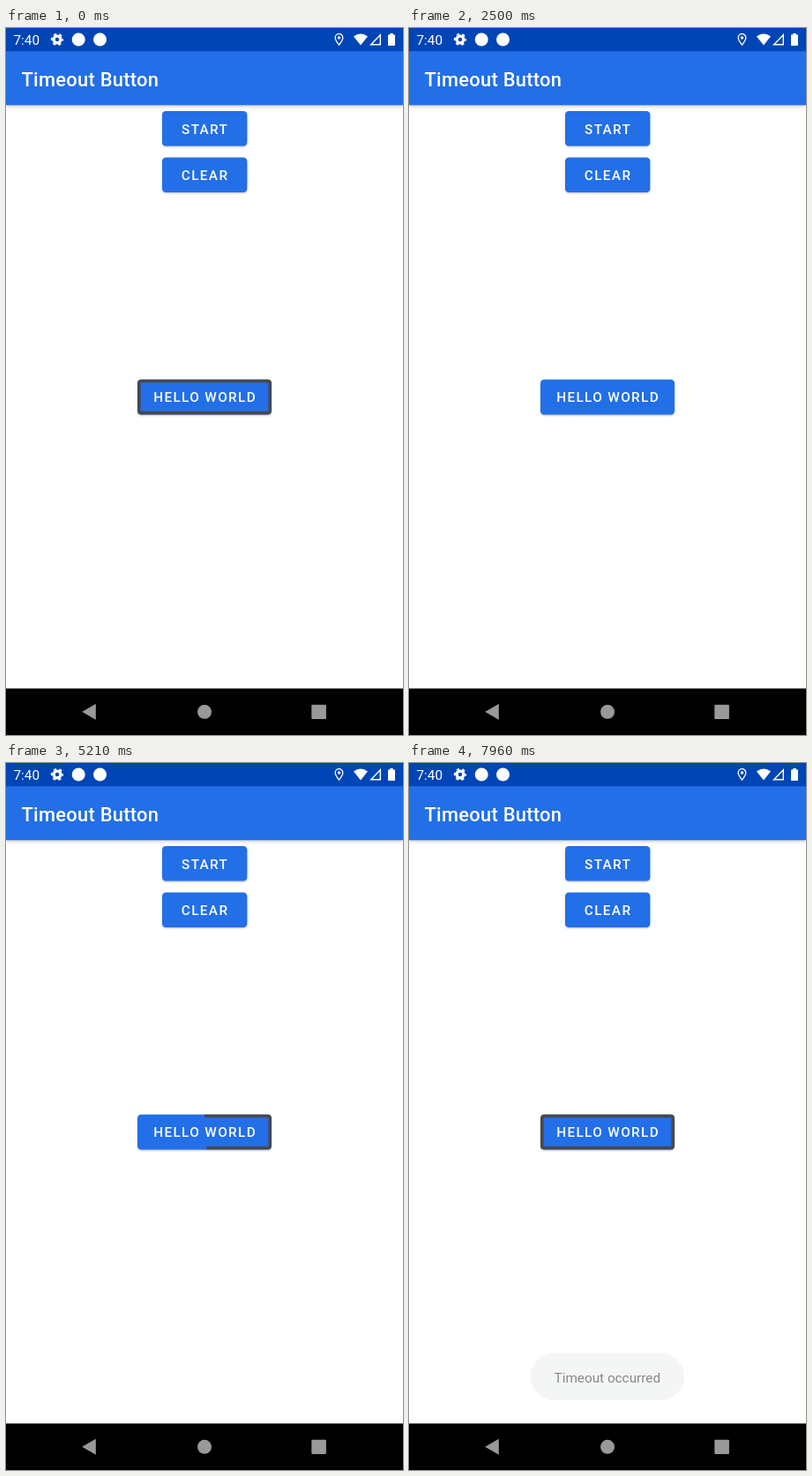
An HTML page for the animation above (8 s loop, 450 by 800 pixels).

```html
<!DOCTYPE html>
<html lang="en">
<head>
<meta charset="utf-8">
<title>Timeout Button</title>
<style>
  html, body { margin: 0; width: 100%; height: 100%; overflow: hidden; background: #fff; }
  svg { display: block; width: 100%; height: 100%; font-family: Roboto, sans-serif; }
  text { fill: #fff; }
  .title { font-size: 21.9px; font-weight: 500; letter-spacing: .0125em; }
  .small { font-size: 15.3px; }
  .button rect { fill: #226fe7; filter: drop-shadow(0 1.2px 1.2px rgba(0, 0, 0, .25)); }
  .button text { font-size: 15.3px; font-weight: 500; letter-spacing: .0893em; text-anchor: middle; }
  .bar { filter: drop-shadow(0 1.5px 2px rgba(0, 0, 0, .25)); }

  .border {
    fill: none; stroke: #47484c; stroke-width: 3.5;
    stroke-dasharray: 1 2;
    animation: countdown 8s linear infinite;
  }
  @keyframes countdown {
    0% { stroke-dashoffset: 0; animation-timing-function: step-end; }
    21.25% { stroke-dashoffset: 1; animation-timing-function: step-end; }
    /* sine ease over five seconds */
    34.125% { stroke-dashoffset: 1; animation-timing-function: cubic-bezier(.37, 0, .63, 1); }
    96.625%, 100% { stroke-dashoffset: 0; }
  }

  .toast { opacity: 0; animation: toast 8s linear infinite; }
  .toast rect { fill: #eaeeec; }
  .toast text { fill: #0f1110; text-anchor: middle; }
  @keyframes toast {
    0%, 97% { opacity: 0; }
    99.5% { opacity: .5; }
    100% { opacity: .6; }
  }
</style>
</head>
<body>
<svg viewBox="0 0 450 800" preserveAspectRatio="none">
  <rect width="450" height="800" fill="#fff"/>

  <rect class="bar" y="26" width="450" height="61.3" fill="#226fe7"/>
  <rect width="450" height="26.3" fill="#0045b5"/>
  <text class="title" x="17.5" y="65.7">Timeout Button</text>

  <!-- status bar -->
  <text class="small" x="8.5" y="19">7:40</text>
  <g fill="none" stroke="#fff">
    <circle cx="58" cy="13" r="3.9" stroke-width="3.4"/>
    <circle cx="58" cy="13" r="6.2" stroke-width="2" stroke-dasharray="3.1 3.393" stroke-dashoffset="1.55"/>
  </g>
  <g fill="#fff">
    <circle cx="82.2" cy="13" r="7.5"/>
    <circle cx="106.5" cy="13" r="7.5"/>
    <path d="M394 9.4Q402 3.4 410 9.4L402 19.4Z"/>
    <path d="M425 6V19.5H412ZM423.6 9.4L415.4 18.1H423.6Z" fill-rule="evenodd"/>
    <path d="M433 8.2Q433 7.4 433.8 7.4H435.3V6H438.7V7.4H440.2Q441 7.4 441 8.2V19.2Q441 20 440.2 20H433.8Q433 20 433 19.2Z"/>
    <circle cx="377.5" cy="11" r="1.7"/>
  </g>
  <path d="M377.5 19.2C375 16 373.2 13.4 373.2 11A4.3 4.3 0 0 1 381.8 11C381.8 13.4 380 16 377.5 19.2Z" fill="none" stroke="#fff" stroke-width="1.3"/>

  <g class="button">
    <rect x="177" y="94" width="96.3" height="39.6" rx="4.2"/>
    <text x="225.6" y="119.6">START</text>
  </g>
  <g class="button">
    <rect x="177" y="146.5" width="96.3" height="39.6" rx="4.2"/>
    <text x="225.6" y="172.1">CLEAR</text>
  </g>
  <g class="button">
    <rect x="149" y="397.8" width="152" height="39.6" rx="4.2"/>
    <path class="border" pathLength="1" d="M225 399.5H296.7Q299.2 399.5 299.2 402V433.1Q299.2 435.6 296.7 435.6H153.3Q150.8 435.6 150.8 433.1V402Q150.8 399.5 153.3 399.5H225"/>
    <text x="225.6" y="423.4">HELLO WORLD</text>
  </g>

  <g class="toast">
    <rect x="137.7" y="667.5" width="174.3" height="53.7" rx="26.8"/>
    <text class="small" x="224.8" y="700.6">Timeout occurred</text>
  </g>

  <!-- navigation bar -->
  <rect y="747.4" width="450" height="52.6"/>
  <g fill="#999">
    <path d="M86.2 773.8L101.8 764.8V782.8Z"/>
    <circle cx="225" cy="773.8" r="8"/>
    <rect x="346.3" y="765.8" width="16.6" height="16.2" rx="1"/>
  </g>
</svg>
</body>
</html>
```
